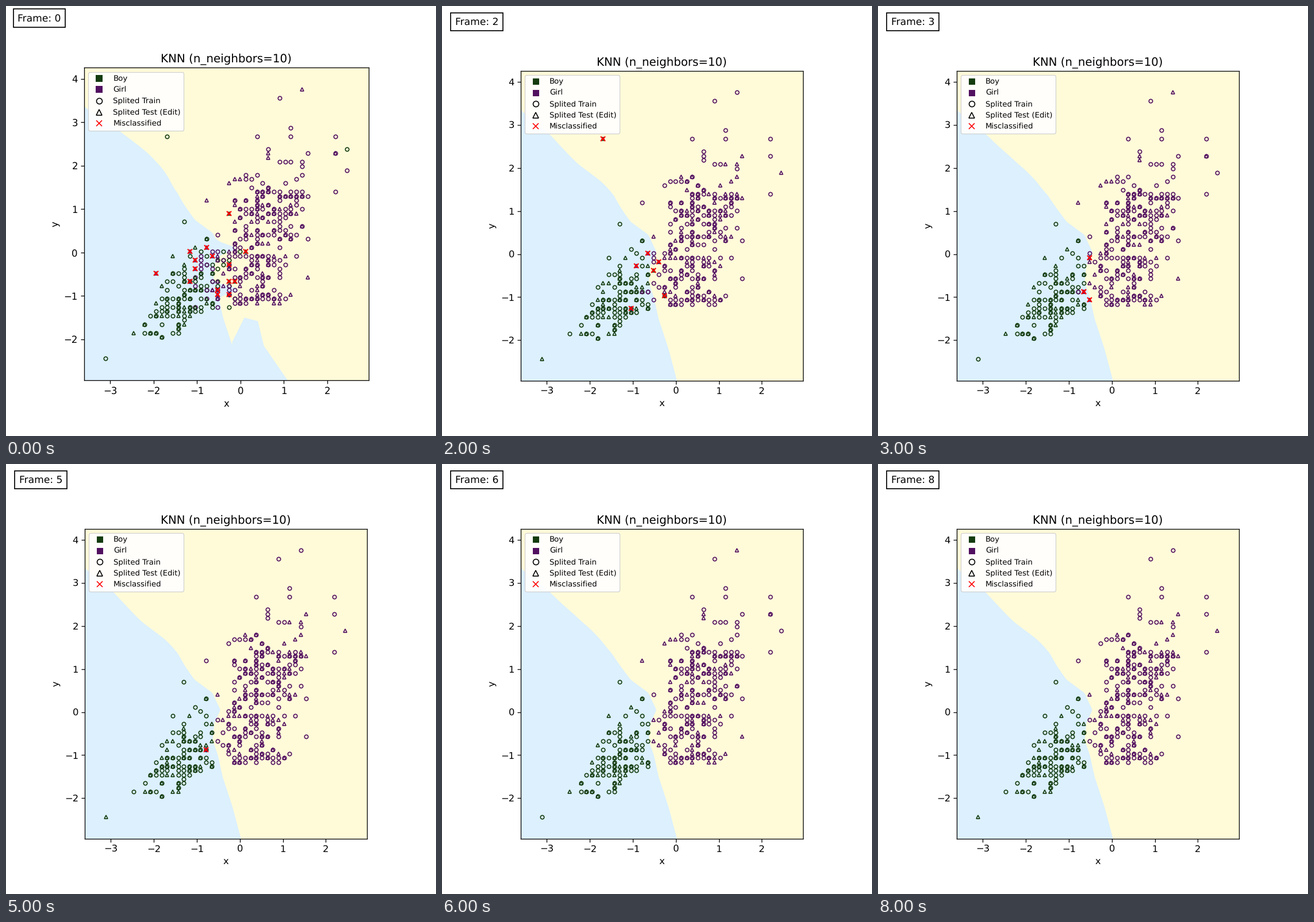
Write a matplotlib script that moves like this. It is 748 by 748 pixels and loops after 9 s.

```python
import numpy as np
import matplotlib.pyplot as plt
from matplotlib.animation import FuncAnimation
from matplotlib.lines import Line2D
from matplotlib.patches import Polygon, Rectangle

SIZE, DPI, ROUNDS = 748, 88, 9
XLIM, YLIM = (-3.607, 2.952), (-2.94, 4.256)
BOY, GIRL, RED = "#143c0f", "#521060", "#ff0000"
YELLOW, BLUE = "#fffbd9", "#dcf0fe"

plt.rcParams.update({"font.family": "DejaVu Sans", "text.hinting": "none"})
fig = plt.figure(figsize=(SIZE / DPI, SIZE / DPI), dpi=DPI, facecolor="white")

# Key points (y, x) of the settled decision border
BORDER = np.array([(-2.95, .03), (-2.2, -.17), (-1.5, -.4), (-1, -.51), (-.65, -.63),
                   (-.25, -.59), (.05, -.45), (.45, -.64), (.75, -1.05),
                   (1.35, -1.5), (1.7, -1.85), (2.1, -2.3), (2.8, -2.95), (4.3, -4.75)])
# Bulges (y, width, amount): one per fold, more in the unedited rounds
BULGES = [(2, .5, .12), (1.25, .35, -.35), (1.6, .4, .1)]
EARLY = {0: [(2.3, .7, .25), (.1, .12, .35), (-.85, .12, .5)],
         1: [(-.87, .06, .35), (-2.9, .6, .22)]}
POCKET = [(-.22, -2.95), (-.19, -2.06), (.09, -1.5), (.4, -1.58), (.54, -2.15),
          (1.09, -2.95)]

# Outliers (column, row, fold) and early misses (column, row, round)
FAR_GIRLS = [(11, 39, 0), (7, 37, 1), (9, 30, 1), (3, 28, 1), (9, 28, 1), (17, 28, 1),
             (5, 25, 1), (19, 20, 2), (17, 15, 1), (-6, 13, 0), (12, -5, 0)]
FAR_BOYS = [(-24, -24, 2), (-19, -18, 0), (-10, 8, 1)]
FAR_MISSES = [(-2, 10, 0), (19, 25, 1), (-13, 28, 2)]
MISS_COUNTS = [14, 22, 6, 4, 1, 1]


def border(turn, y):
    x = np.interp(y, *BORDER.T)
    for mid, width, amount in [BULGES[turn % 3]] + EARLY.get(turn, []):
        x = x + amount * np.exp(-((y - mid) / width) ** 2)
    return x


def place(col, row):
    return -.006 + .12933 * col, -.08 + .0984 * row


def girl_chance(col, row):
    """Every fifth row is crowded; a thin tail reaches upwards."""
    weight = .9 if row % 5 == 0 else .52
    body = weight / (1 + np.exp((row - 15.5) * 2)) + .13 * (row > 15)
    spread = 6.2 if row <= 15 else 7
    return body * np.exp(-((col - 3.3 - .18 * row) / spread) ** 4)


def boy_chance(col, row):
    weight = .95 if row % 2 == 0 else .5
    mid = -10 + .5 * (row + 9)
    return weight * np.exp(-((row + 10) / 7) ** 2 / 2 - ((col - mid) / 4.8) ** 4)


def build_points():
    """Return (x, y, colour, folds, last round) for every site."""
    rng = np.random.default_rng(10)
    points = []
    for color, chance, rows, far in ((GIRL, girl_chance, range(-11, 25), FAR_GIRLS),
                                     (BOY, boy_chance, range(-19, 5), FAR_BOYS)):
        for row in rows:
            for col in range(-17, 18):
                x, y = place(col, row)
                odds = chance(col, row)
                fits = (x > border(2, y)) == (color == GIRL)
                if rng.random() < odds and fits:
                    count = 1 + rng.poisson(.4 + 1.3 * odds)
                    folds = set(rng.integers(0, 3, count).tolist())
                    points.append((x, y, color, folds, ROUNDS))
        points += [(*place(c, r), color, {f}, ROUNDS) for c, r, f in far]

    # Misses scatter around the border and close in on it round by round
    misses = list(FAR_MISSES)
    for turn, count in enumerate(MISS_COUNTS):
        for row in rng.integers(-12, 3, count):
            x = border(2, place(0, row)[1])
            col = round(x / .12933 + rng.normal(0, 4.5 / (1 + turn)))
            misses.append((col, row, turn))
    for col, row, turn in misses:
        x, y = place(col, row)
        color = BOY if x > border(turn, y) else GIRL
        points.append((x, y, color, {turn % 3}, turn))
    return points


POINTS = build_points()


def pt(px):
    return px * 72 / DPI


def marks(ax, points, marker, color, size, width, z):
    if points:
        ax.plot([p[0] for p in points], [p[1] for p in points], ls="none",
                marker=marker, ms=pt(size), mfc="none", mec=color,
                mew=pt(width), zorder=z)


def key(marker, color, label, k, fill="none"):
    return Line2D([], [], ls="none", marker=marker, ms=pt(9.9 * k), mfc=fill,
                  mec=color, mew=pt(1.6 * k), label=label)


def add_axes(left, top, right, bottom, k):
    ax = fig.add_axes([left / SIZE, 1 - bottom / SIZE,
                       (right - left) / SIZE, (bottom - top) / SIZE])
    ax.set(xlim=XLIM, ylim=YLIM, facecolor=YELLOW,
           xticks=range(-3, 3), yticks=range(-2, 5))
    ax.tick_params(length=pt(5.6 * k), width=pt(1.3 * k), pad=pt(5 * k),
                   labelsize=pt(16.4 * k))
    for spine in ax.spines.values():
        spine.set_linewidth(pt(1.3 * k))
    ax.set_title("KNN (n_neighbors=10)", fontsize=pt(19.7 * k), pad=pt(9.9 * k))
    ax.set_xlabel("x", fontsize=pt(16.4 * k), labelpad=pt(5.8 * k))
    ax.set_ylabel("y", fontsize=pt(16.4 * k), labelpad=pt(6.6 * k))
    return ax


def add_legend(ax, k):
    handles = [key("s", BOY, "Boy", k, BOY), key("s", GIRL, "Girl", k, GIRL),
               key("o", "black", "Splited Train", k),
               key("^", "black", "Splited Test (Edit)", k),
               key("x", RED, "Misclassified", k)]
    for square in handles[:2]:
        square.set(markeredgewidth=0, markersize=pt(11 * k))
    ax.legend(handles=handles, loc="upper left", fontsize=pt(13.3 * k),
              borderaxespad=.58, labelspacing=.53, framealpha=.9)


def add_counter(turn, left, top, right, bottom):
    fig.add_artist(Rectangle((left, SIZE - bottom), right - left, bottom - top,
                             transform=None, fc="white", ec="black", lw=pt(1.7)))
    fig.text((left + right) / 2 / SIZE, 1 - ((top + bottom) / 2 + 6) / SIZE,
             f"Frame: {turn}", fontsize=pt(17.1), ha="center", va="baseline")


def draw(turn):
    fig.clf()
    if turn == 0:
        k, frame, box = 1.009, (135.5, 107.3, 630.8, 650.9), (12.5, 4.5, 103, 36.5)
    else:
        k, frame, box = 1, (136.7, 112.7, 627.7, 651.8), (15, 11.5, 105.5, 42.5)
    ax = add_axes(*frame, k)

    ys = np.linspace(4.3, -2.95, 200)
    edge = list(zip(border(turn, ys), ys))
    for area in [edge + [(-5, -2.95)]] + [POCKET] * (turn == 0):
        ax.add_patch(Polygon(area, fc=BLUE, ec="none", zorder=.5))

    fold = turn % 3
    for color in (BOY, GIRL):
        live = [p for p in POINTS if p[2] == color and turn <= p[4]]
        marks(ax, [p for p in live if p[3] - {fold}], "o", color, 6.4 * k, 1.65, 2)
        marks(ax, [p for p in live if fold in p[3]], "^", color, 6.4 * k, 1.65, 2.1)
    marks(ax, [p for p in POINTS if p[4] == turn], "x", RED, 8.6 * k, 2.1, 3)

    add_legend(ax, k)
    add_counter(turn, *box)


anim = FuncAnimation(fig, draw, frames=ROUNDS, interval=1000, repeat=True)
plt.show()
```
